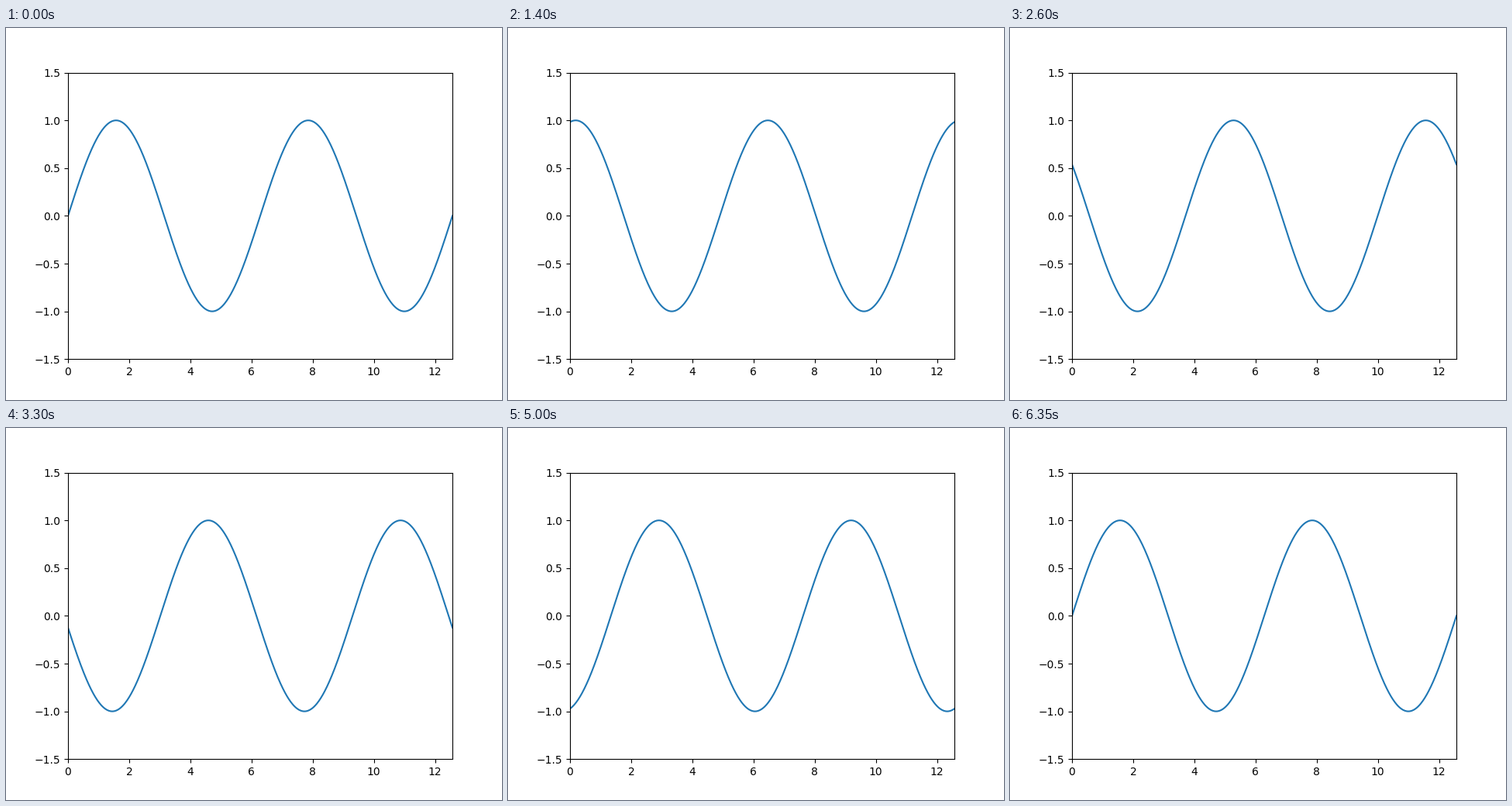
A matplotlib script for the animation above (6.4 s loop, 640 by 480 pixels).

```python
import matplotlib.pyplot as plt
import numpy as np
from matplotlib.animation import FuncAnimation

FRAMES = 128
INTERVAL = 50  # ms

x = np.linspace(0, 4 * np.pi, 1000)
# Both ends of the cycle are included, so the last phase equals the first.
phases = np.linspace(0, 2 * np.pi, FRAMES)

fig, ax = plt.subplots(figsize=(6.4, 4.8), dpi=100)
ax.set_xlim(0, 4 * np.pi)
ax.set_ylim(-1.5, 1.5)
line, = ax.plot(x, np.sin(x), color="tab:blue", lw=1.5)


def update(i):
    line.set_ydata(np.sin(x + phases[i]))
    return line,


anim = FuncAnimation(fig, update, frames=FRAMES, interval=INTERVAL,
                     repeat=True, repeat_delay=0)
plt.show()
```
